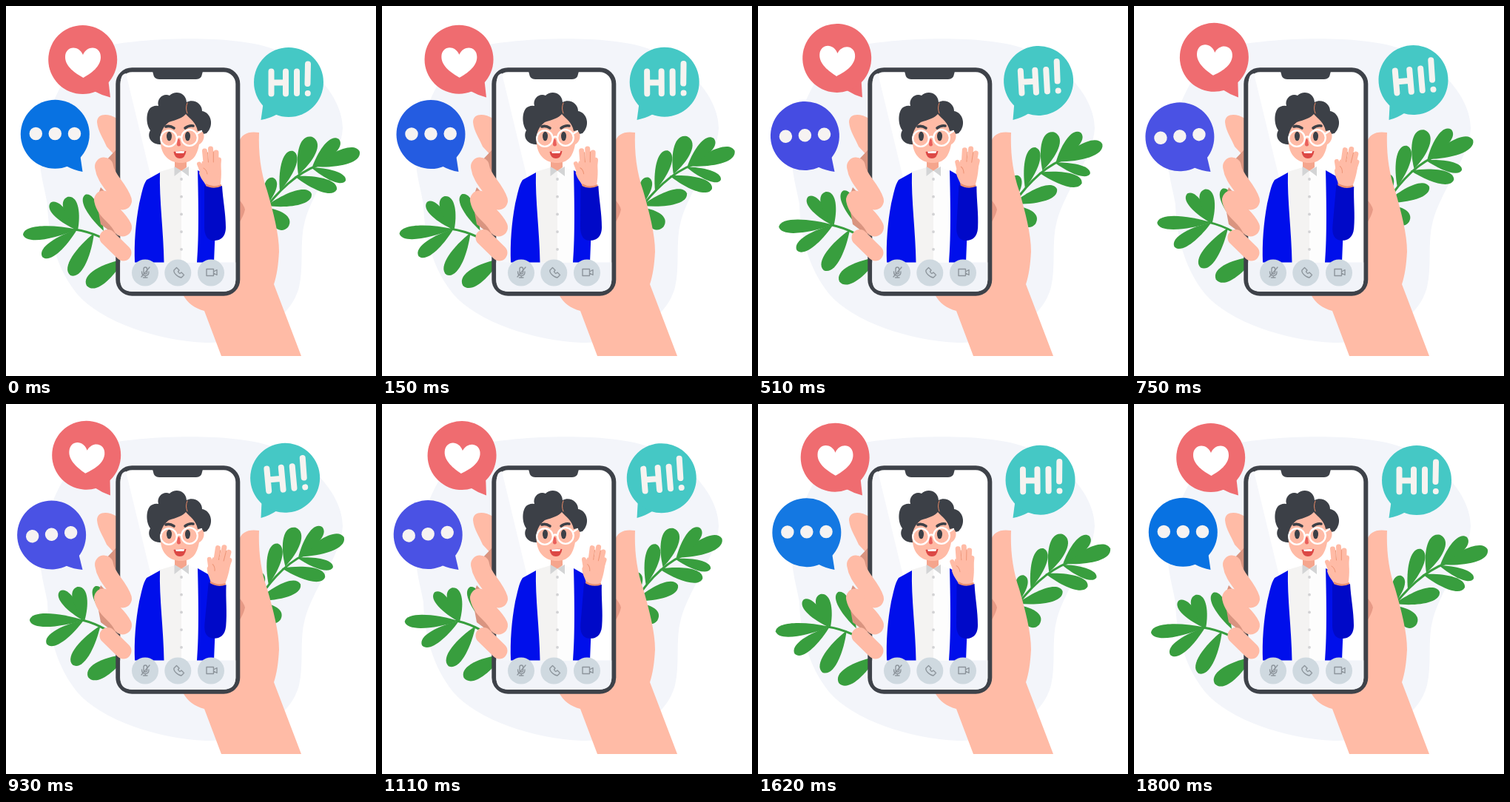
Animation of 500x500 px, one loop 1.86 s. Source, as an HTML page:

```html
<!DOCTYPE html>
<html lang="en">
<head>
<meta charset="utf-8">
<title>Video call</title>
<style>
html, body { margin: 0; height: 100%; overflow: hidden; background: #fff; }
svg { display: block; width: 100%; height: 100%; }
.line { fill: none; stroke-linecap: round; stroke-linejoin: round; }
.skin { fill: #ffbba6; }
.leaf { fill: #389e3e; }
</style>
</head>
<body>
<svg viewBox="0 0 500 500">
  <path fill="#f3f5fa" d="M130 55C175 44 300 37 358 57C410 73 455 122 455 165C453 205 417 245 404 290C396 320 403 350 396 380C384 425 330 455 270 455C205 452 130 428 96 389C68 354 57 310 56 268C51 240 45 225 46 200C51 155 75 75 130 55Z"/>

  <g id="leftPlant" class="leaf">
    <path class="line" stroke="#389e3e" stroke-width="3" d="M93 302Q128 307 160 332"/>
  </g>
  <g id="rightPlant" class="leaf">
    <path class="line" stroke="#389e3e" stroke-width="3" d="M422 215C392 226 368 250 345 280"/>
  </g>

  <!-- Palm, thumb and forearm -->
  <path class="skin" d="M314 186C318 172 328 169 342 171C341 198 344 224 353 250C361 278 369 308 369 332C368 350 366 364 362 376L399 473H291L268 412C254 408 246 402 239 390L300 300Z"/>
  <path fill="#e79a86" d="M315 262Q321 268 323 275Q321 284 315 293Z"/>
  <path class="skin" d="M150 152C139 145 123 144 123 157C124 169 131 178 136 190L150 205Z"/>
  <path fill="#d99480" d="M150 193L132 212L150 240ZM122 262L128 245L152 270V313L128 295Z"/>

  <!-- Phone -->
  <rect x="151.3" y="86.3" width="162" height="302.500" rx="19" fill="#fff" stroke="#3e4249" stroke-width="6"/>
  <path fill="#f6f7fb" d="M155 100Q156 92 162 91L197 236L172 347H155Z"/>
  <path fill="#f2f4f9" d="M154.300 346.500H310.300V370Q310 385.800 294 385.800H170Q154.300 385.800 154.300 370Z"/>
  <path fill="#3e4249" d="M196 86H268Q265 89 265 92Q264 99 257 99H207Q200 99 199 92Q199 89 196 86Z"/>

  <!-- Caller -->
  <path fill="#f4f3f2" d="M208 224L228 218H237V346.500H212Z"/>
  <path fill="#fdfdfd" d="M237 218H247L260 223V346.500H237Z"/>
  <path fill="#000feb" d="M208 225L190 235C185 242 183 255 180 267C175 294 173 320 174 346.500H213.500C213 306 207 262 208 225ZM259 222L273 230L285 247L281 346.500H258C261 310 260 260 259 222Z"/>
  <path fill="#f5a58d" d="M228 204H244V218L237 223L228 218Z"/>
  <path fill="#d3d4d5" d="M227.500 217L237 222.500L227.500 230ZM247 217L237 222.500L247 230Z"/>
  <g id="buttons" fill="#d2d2d4"></g>
  <path fill="#3c4047" d="M207 187C196 186 190 177 195 168C188 159 189 139 198 136Q202 134 206 135C203 125 213 117 221 121C228 114 243 116 244 130C254 125 265 132 265 142C277 144 282 161 271 172L262 174L235 190Z"/>
  <path class="skin" d="M209 187C207 172 212 163 220 157C230 154 239 151 243 146C248 152 257 157 259 169C269 165 271 182 261 187C258 204 251 212 236 212C222 212 211 203 209 187Z"/>
  <path class="line" stroke="#e98a66" stroke-width="1" d="M245 131Q242 138 245 145"/>
  <path class="line" stroke="#3c4047" stroke-width="3.600" d="M216 163Q221 161 227 165M242 165Q247 161 253 162"/>
  <g id="eyes" fill="#3c4047">
    <ellipse cx="220.500" cy="176" rx="3.500" ry="6.300"/>
    <ellipse cx="245.500" cy="176" rx="3.500" ry="6.300"/>
  </g>
  <path fill="#e9605c" d="M231.500 181Q233.500 178 235 181L236 188Q233.500 191 231 188Z"/>
  <g class="line" stroke="#fff" stroke-width="2.300">
    <circle cx="220" cy="179" r="10.800"/>
    <circle cx="248" cy="178" r="10.800"/>
    <path d="M231 178Q234 175 237 178M258 173L264 169"/>
  </g>
  <path fill="#dc4845" d="M226.500 197Q235 195 243.500 196Q242 206 235 206Q228 206 226.500 197Z"/>
  <path fill="#fff" d="M229 196.600Q235 195.500 241.500 196.200L240 199H230Z"/>

  <!-- Waving arm -->
  <g id="arm">
    <g id="palm">
      <path class="skin" d="M265 210L289 207C292 222 291 234 289 247H272C270 239 264 236 261 226Z"/>
      <g class="line" stroke="#ffbba6">
        <path stroke-width="7" d="M268.500 196L271 222M276.500 193L278 222M284 198L283.500 222M287.500 208L286 226"/>
        <path stroke-width="6" d="M261 213.500Q264 222 269 231"/>
      </g>
      <path class="line" stroke="#ed9476" stroke-width="1" d="M272.500 198L273.500 211M280.300 197V211M267 219Q271 221 272 227"/>
    </g>
    <path fill="#e88e70" d="M270 240Q280 246 291 241V248H270Z"/>
    <path fill="#0009c8" d="M268 242Q280 249 292 243C293 262 297 280 297 299C297 313 289 317 281 317C272 317 268 310 268 298Z"/>
  </g>

  <!-- Call controls -->
  <g fill="#cfd9e0">
    <circle cx="188" cy="360.500" r="18"/>
    <circle cx="232.300" cy="360.500" r="18"/>
    <circle cx="277" cy="360.500" r="18"/>
  </g>
  <g class="line" stroke="#8d959c" stroke-width="1.400">
    <rect x="186" y="353" width="4.600" height="9" rx="2.300"/>
    <path d="M183.500 359Q183.500 364.500 188.300 364.500Q193 364.500 193 359M188.300 364.500V367M185.500 367H191M194 353L183 366"/>
    <path d="M227 357L230.500 353.500L234 357L232.500 359Q233.500 361 235 361.500L237 360L240.500 363.500L237 367C233 367 226 361 227 357Z"/>
    <path d="M271 355.500H280.500V364.500H271ZM280.500 359L285 356.500V363.500L280.500 361Z"/>
  </g>

  <!-- Fingers around the phone -->
  <g class="line" stroke="#ffbba6">
    <path stroke-width="25" d="M132.500 217C135 235 151 244 157.500 263"/>
    <path stroke-width="25" d="M131.500 262C135 279 150 283 157.500 299"/>
    <path stroke-width="22" d="M137.500 313L158.500 333.500"/>
  </g>

  <!-- Speech bubbles -->
  <g id="love">
    <path fill="#ef6c70" d="M119 115Q130 121 141 123.500L138 98L110 90Z"/>
    <circle cx="103.700" cy="72.500" r="46.500" fill="#ef6c70"/>
    <path fill="#fff" d="M104.500 97C94 91 80 82 80 69C80 54 98 52 104 66C110 52 128 54 128 69C128 82 115 91 104.500 97Z"/>
  </g>
  <g id="dots">
    <path d="M81 216Q92 222 103.500 224L100 200L70 190Z"/>
    <circle cx="66.300" cy="173.300" r="46.500"/>
    <path class="line" stroke="#f6f3f2" stroke-width="17.500" d="M40.300 172.500h0M66.300 172.500h0M92.500 172.500h0"/>
  </g>
  <g id="greet">
    <path fill="#45c8c5" d="M367 146Q356 152 344.500 154L348 129L376 120Z"/>
    <circle cx="382" cy="103" r="47" fill="#45c8c5"/>
    <path class="line" stroke="#f6f3f0" stroke-width="8" d="M358.500 88.500V118.500M378 88.500V118.500M358.500 103.500H378M393 88.500V118M408 78.500L407.500 105M407.800 118h0"/>
  </g>
</svg>
<script>
const $ = id => document.getElementById(id);
const NS = "http://www.w3.org/2000/svg";

function add(parent, tag, attrs) {
  const el = document.createElementNS(NS, tag);
  for (const name in attrs) el.setAttribute(name, attrs[name]);
  $(parent).append(el);
}

// A leaf grows from its base (x, y) to its tip and is widest near the tip.
function leaf(plant, x, y, tipX, tipY, w) {
  const dx = tipX - x, dy = tipY - y, len = Math.hypot(dx, dy);
  const turn = Math.atan2(dy, dx) * 180 / Math.PI;
  add(plant, "path", {
    d: `M0 0C${len * .42} ${-w * .75} ${len * .96} ${-w * 1.1} ${len} 0C${len * .96} ${w * 1.1} ${len * .42} ${w * .75} 0 0Z`,
    transform: `translate(${x} ${y}) rotate(${turn})`
  });
}

[
  [96, 302, 23, 309, 13], [96, 303, 60, 266, 12], [97, 303, 83, 258, 14],
  [132, 304, 107, 255, 12], [96, 302, 49, 339, 13], [119, 307, 87, 364, 15],
  [160, 342, 109, 378, 16]
].forEach(l => leaf("leftPlant", ...l));
[
  [415, 217, 478, 197, 15], [414, 217, 450, 180, 13], [395, 228, 414, 177, 17],
  [412, 218, 459, 236, 10], [390, 230, 447, 248, 13], [370, 250, 388, 196, 14],
  [348, 274, 361, 232, 12], [352, 270, 413, 254, 14], [348, 272, 381, 299, 16]
].forEach(l => leaf("rightPlant", ...l));
for (let i = 0; i < 5; i++) add("buttons", "circle", { cx: 237, cy: 234 + i * 23.7, r: 1.9 });

// Degrees turned at the far end of the swing, and the pivot.
const swings = {
  leftPlant: [5.5, 205, 393],
  rightPlant: [-6, 305, 392],
  love: [5.5, 141, 123],
  dots: [-5.5, 103, 224],
  greet: [-5.3, 345, 154],
  arm: [5.5, 283, 302],
  palm: [9, 280, 244]
};
const blues = [
  [0, 8, 114, 226], [300, 64, 70, 224], [750, 74, 82, 228], [1110, 74, 82, 228],
  [1350, 0, 16, 240], [1620, 20, 120, 226], [1800, 8, 114, 226]
];

function blueAt(t) {
  const i = Math.max(1, blues.findIndex(k => k[0] >= t));
  const a = blues[i - 1], b = blues[i], f = (t - a[0]) / (b[0] - a[0]);
  return `rgb(${[1, 2, 3].map(c => Math.round(a[c] + (b[c] - a[c]) * f))})`;
}

function draw(now) {
  const step = Math.floor((now % 1860) / 30) * 30;
  const t = Math.min(step, 1800);
  const swing = (1 - Math.cos(t / 900 * Math.PI)) / 2;
  for (const id in swings) {
    const [deg, x, y] = swings[id];
    $(id).setAttribute("transform", `rotate(${deg * swing} ${x} ${y})`);
  }
  const open = Math.min(1, Math.abs(t - 300) / 150, Math.abs(t - 1260) / 150);
  $("eyes").setAttribute("transform", `translate(0 ${176 * (1 - open)}) scale(1 ${open})`);
  $("dots").setAttribute("fill", blueAt(t));
}

const start = performance.now();
function tick() {
  draw(performance.now() - start);
  requestAnimationFrame(tick);
}
tick();
</script>
</body>
</html>
```
